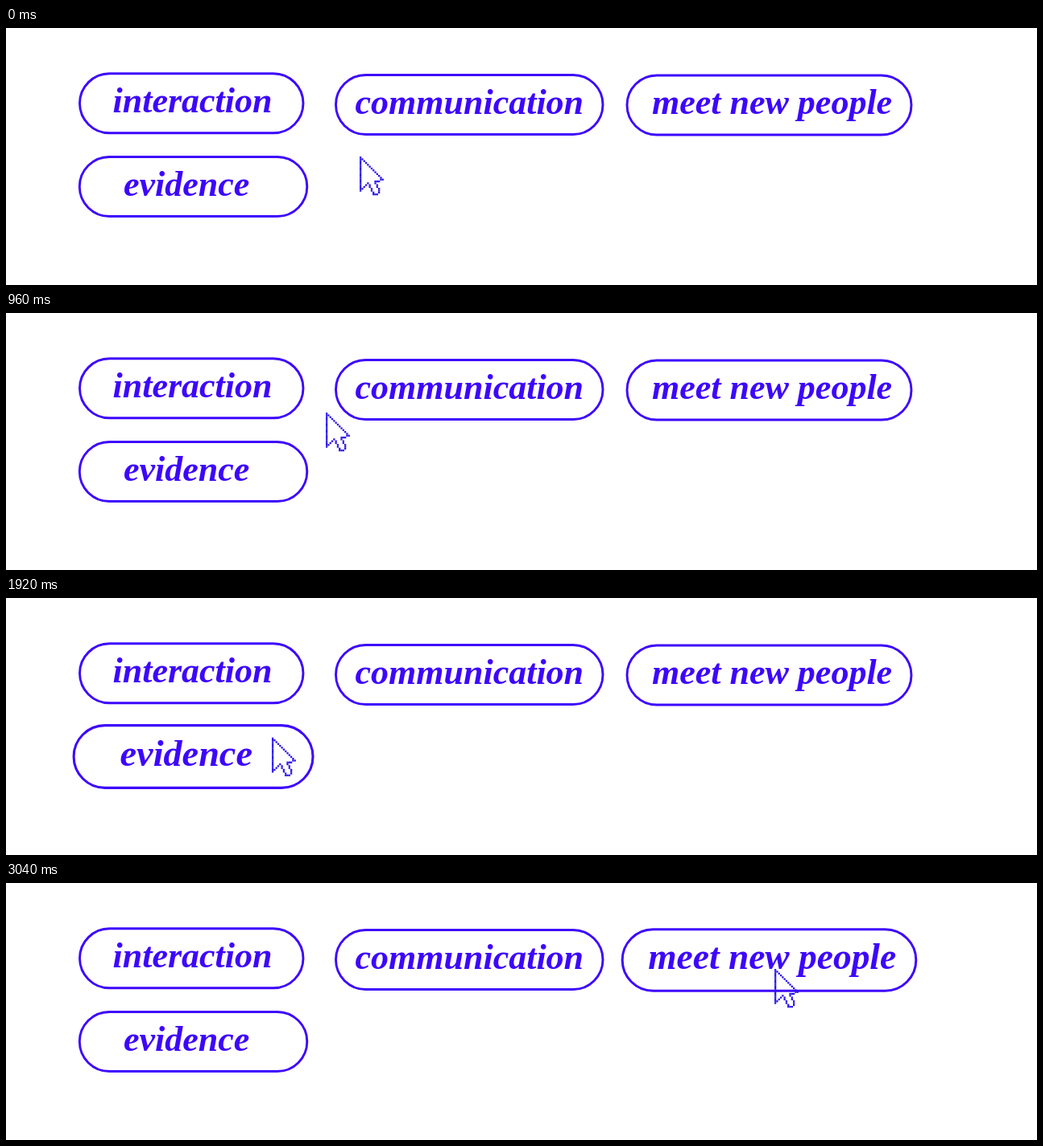
An HTML page with a canvas for the animation above (3080 ms loop, 1280 by 320 pixels).

```html
<!DOCTYPE html>
<html lang="en">
<head>
<meta charset="utf-8">
<title>Tag hover</title>
<style>
html, body { margin: 0; width: 100%; height: 100%; overflow: hidden; background: #fff; }
canvas { display: block; width: 1280px; height: 320px; }
</style>
</head>
<body>
<canvas id="stage" width="1280" height="320"></canvas>
<script>
const LOOP = 3080, STEP = 40;
const HEIGHT = 74, RADIUS = HEIGHT / 2, BASELINE = 48;
const CELL = 2.3;
const ctx = document.getElementById('stage').getContext('2d');

const tags = [
  { label: 'interaction', x: 91.5, y: 56.8, w: 277.5, inset: 41 },
  { label: 'communication', x: 409.5, y: 58.5, w: 331.5, inset: 24 },
  { label: 'meet new people', x: 771, y: 59, w: 353, inset: 31, grow: 0.033 },
  { label: 'evidence', x: 91.3, y: 160.5, w: 282.5, inset: 54.7 }
];

// Turning points of the pointer: time, x, y
const route = [
  [0, 440, 160], [140, 330, 102], [640, 473, 99], [800, 408, 118],
  [960, 398, 124], [1300, 352, 130], [1600, 250, 173], [1700, 236, 181],
  [2240, 597, 151], [2600, 844, 120], [2800, 955, 107], [LOOP, 955, 107]
];

// Corners of the arrow on a coarse pixel grid
const arrow = [[0, 0], [0, 18], [4, 14], [7, 20], [9, 20], [10, 18], [8, 13], [12, 12], [0, 0]];

const clamp = (v, low = 0, high = 1) => Math.min(high, Math.max(low, v));
const mix = (a, b, u) => a + (b - a) * u;

function slope(i, axis) {
  const a = route[i], b = route[i + 1];
  return a && b ? (b[axis] - a[axis]) / (b[0] - a[0]) : 0;
}

function tangent(i, axis) {
  const a = slope(i - 1, axis), b = slope(i, axis);
  return a * b > 0 ? 2 * a * b / (a + b) : 0;
}

// Cubic interpolation that does not overshoot
function pointer(t) {
  const i = route.findIndex((p, k) => t < route[k + 1][0]);
  const a = route[i], b = route[i + 1], d = b[0] - a[0], u = (t - a[0]) / d;
  return [1, 2].map(axis => mix(a[axis], b[axis], u * u * (3 - 2 * u))
    + d * u * (1 - u) * ((1 - u) * tangent(i, axis) - u * tangent(i + 1, axis)));
}

function inside({ x, y, w }, [px, py]) {
  const nearest = clamp(px, x + RADIUS, x + w - RADIUS);
  return Math.hypot(px - nearest, py - y - RADIUS) < RADIUS;
}

// Growth starts after the pointer has stayed for half of the last six steps
function hover(tag, t) {
  let count = 0;
  for (let k = 0; k < 6; k++) count += inside(tag, pointer(Math.max(0, t - k * STEP)));
  return clamp(count / 3 - 1);
}

function drawTag(tag, t) {
  const { label, x, y, w, inset, grow = 0.051 } = tag;
  const scale = 1 + grow * hover(tag, t);
  ctx.save();
  ctx.translate(x + w / 2, y + RADIUS);
  ctx.scale(scale, scale);
  ctx.translate(-w / 2, -RADIUS);
  ctx.beginPath();
  ctx.roundRect(0, 0, w, HEIGHT, RADIUS);
  ctx.stroke();
  ctx.fillText(label, inset, BASELINE);
  ctx.restore();
}

function drawPointer([x, y]) {
  for (let i = 1; i < arrow.length; i++) {
    const [ax, ay] = arrow[i - 1], [bx, by] = arrow[i];
    const n = Math.max(Math.abs(bx - ax), Math.abs(by - ay));
    for (let k = 0; k < n; k++) {
      const gx = Math.round(mix(ax, bx, k / n)), gy = Math.round(mix(ay, by, k / n));
      ctx.fillRect(x + gx * CELL, y + gy * CELL, CELL, CELL);
    }
  }
}

function draw(now) {
  const t = Math.floor(now % LOOP / STEP) * STEP;
  ctx.clearRect(0, 0, 1280, 320);
  ctx.fillStyle = ctx.strokeStyle = '#3d06fc';
  ctx.lineWidth = 2.9;
  ctx.font = 'italic bold 44px "Liberation Serif", serif';
  tags.forEach(tag => drawTag(tag, t));
  ctx.fillStyle = '#2a14ea';
  const [x, y] = pointer(t);
  drawPointer([x - 1, y]);
}

let start;
function tick(now) {
  start ??= now;
  draw(now - start);
  requestAnimationFrame(tick);
}
requestAnimationFrame(tick);
</script>
</body>
</html>
```
